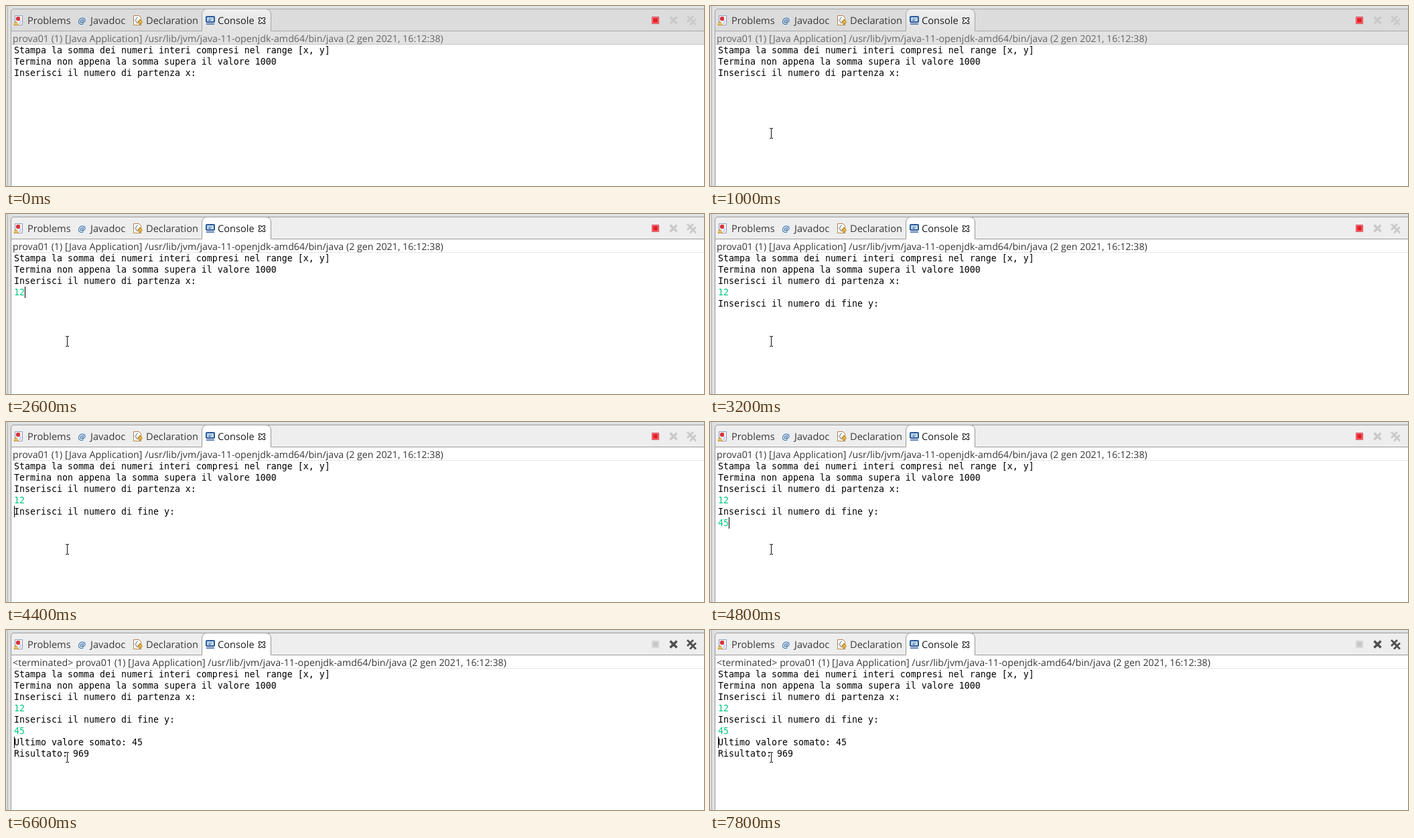
These frames come from a looping animation (1042x270 px, 8000 ms). An HTML page:

```html
<!DOCTYPE html>
<html lang="it">
<head>
<meta charset="utf-8">
<title>Console</title>
<style>
  html, body { margin: 0; width: 100%; height: 100%; overflow: hidden; background: #e1e1e1; }
  svg { display: block; position: absolute; left: 0; top: 0; }
  text { white-space: pre; text-rendering: geometricPrecision; }
  .ui { font: 14.6px "Open Sans", "Noto Sans", sans-serif; fill: #383838; }
  #header { font-size: 14.25px; fill: #666; }
  #console {
    position: absolute; left: 12px; top: 58px; margin: 0; color: #000;
    font: 13.29px/17px "DejaVu Sans Mono", monospace;
  }
  #console div { height: 17px; }
  #console .input { color: #00c87d; }
  .line { fill: none; stroke: #a6a6a6; }
  #bar { fill: #dcdcdc; }
  #tab { fill: url(#tabIdle); }
  #strip { fill: #e2e2e2; }
  #rule { fill: #c6c6c6; }
  .focus #bar { fill: #eee; }
  .focus #tab { fill: #fff; }
  .focus #strip { fill: #fff; }
  .focus #rule { fill: #e6e6e6; }
  .focus #header { fill: #363636; }
  #title { fill: #1c1c1c; }
  .focus .line { stroke: #989898; }
  #stop { fill: #e8202a; stroke: #f28c8c; }
  #stopEdge { fill: #dc4048; }
  .cross { fill: none; stroke: #cacaca; stroke-width: 3.6; }
  .done #stop { fill: #c8c8c8; stroke: #dcdcdc; }
  .done #stopEdge { fill: #d2d2d2; }
  .done .cross { stroke: #505050; }
</style>
</head>
<body>
<svg id="stage" width="1042" height="270" viewBox="0 0 1042 270">
  <defs>
    <linearGradient id="tabIdle" x2="0" y2="1"><stop stop-color="#efefef"/><stop offset="1" stop-color="#e2e2e2"/></linearGradient>
  </defs>

  <rect width="1042" height="270" fill="#e1e1e1"/>
  <path d="M2.5 0V270" stroke="#adadad"/>
  <path id="bar" d="M7.5 38V9Q7.5 4.5 12 4.5H1042V38Z"/>
  <rect id="strip" x="8" y="38" width="1034" height="232"/>
  <rect x="9" y="58" width="1033" height="212" fill="#fff"/>
  <rect id="rule" x="9" y="57" width="1033" height="1"/>
  <path id="tab" d="M292.5 39V13Q292.5 4.5 300 4.5H387Q395.5 4.5 395.5 13V39Z"/>
  <path class="line" d="M7.5 270V9Q7.5 4.5 12 4.5H1042M8 37.5H292.5V13Q292.5 4.5 300 4.5H387Q395.5 4.5 395.5 13V37.5H1042"/>

  <g class="ui">
    <text x="32" y="27">Problems</text>
    <text x="126" y="27">Javadoc</text>
    <text x="209" y="27">Declaration</text>
    <text x="316" y="27" id="title">Console</text>
    <text x="10" y="54" id="header"></text>
  </g>

  <!-- problems -->
  <path d="M13.5 14.5H24.5V28.5H13.5Z" fill="#f7f8fc" stroke="#8f9bb5"/>
  <path d="M19 25.5H23M20 22.5H23" stroke="#8fa4cc"/>
  <rect x="15" y="16" width="6" height="6" rx="2" fill="#d9303a"/>
  <path d="M15 23L18 28.5H12Z" fill="#fbd35c" stroke="#c88a1e"/>
  <!-- javadoc -->
  <text x="107.5" y="26" font-family="DejaVu Sans, sans-serif" font-size="12" font-weight="bold" font-style="italic" fill="#3572ad">@</text>
  <!-- declaration -->
  <path d="M190.5 14.5H198.5L201.5 17.5V28.5H190.5Z" fill="#fffdf3" stroke="#a98646"/>
  <path d="M197 17.5Q193.5 17 194.5 20Q194 21.5 192.5 21.5Q194 21.5 194.5 23Q193.5 26 197 25.5" fill="none" stroke="#5b7bab"/>
  <path d="M197 22.5H199.5V20L203.5 24L199.5 28V25.5H197Z" fill="#f6c04b" stroke="#a86f14"/>
  <!-- console -->
  <rect x="298.5" y="15.5" width="13" height="9" rx="1" fill="#386cae" stroke="#214f8c"/>
  <rect x="300.5" y="17.5" width="9" height="5" fill="#e8f2fc" stroke="#a8c6e6"/>
  <path d="M302 19.5H308M302 21.5H306" stroke="#3a66a2"/>
  <path d="M299 27H311" stroke="#5f7fae" stroke-width="2"/>
  <!-- close -->
  <path d="M377.5 17.5H380L382 19.5L384 17.5H386.5V20L384.5 22L386.5 24V26.5H384L382 24.5L380 26.5H377.5V24L379.5 22L377.5 20Z" fill="#fff" stroke="#262626" stroke-width="1.2"/>
  <!-- toolbar -->
  <rect id="stopEdge" x="964" y="16" width="11" height="11" rx="1"/>
  <rect id="stop" x="965.5" y="17.5" width="8" height="8"/>
  <path class="cross" d="M991.5 16.5L1001.5 26.5M1001.5 16.5L991.5 26.5"/>
  <path class="cross" style="stroke-width:2.8" d="M1017 15L1026 24M1026 15L1017 24M1021 19.5L1030 28.5M1030 19.5L1021 28.5"/>
</svg>

<div id="console"></div>

<svg width="1042" height="270" viewBox="0 0 1042 270">
  <rect id="caret" width="1" height="17"/>
  <g id="mouse" fill="none">
    <path d="M-2 -7.5H0L.5 -7L1 -7.5H3M.5 -7V7M-2 7.5H0L.5 7L1 7.5H3" stroke="#fff" stroke-width="3" opacity=".8"/>
    <path d="M-2 -7.5H0L.5 -7L1 -7.5H3M.5 -7V7M-2 7.5H0L.5 7L1 7.5H3" stroke="#111"/>
  </g>
</svg>
<script>
const DURATION = 8000, LINE = 17, CHAR = 8, LEFT = 12, TOP = 58;
const LAUNCH = 'prova01 (1) [Java Application] /usr/lib/jvm/java-11-openjdk-amd64/bin/java (2 gen 2021, 16:12:38)';
const INTRO = [
  'Stampa la somma dei numeri interi compresi nel range [x, y]',
  'Termina non appena la somma supera il valore 1000',
  'Inserisci il numero di partenza x:'
];
const INPUT_ROWS = [3, 5];

// Each step changes part of the state; caret is [row, column], mouse is [x, y].
const steps = [
  [0, { x: '', prompt: '', y: '', result: [], caret: null, mouse: null, focus: false, done: false }],
  [500, { mouse: [98, 70] }],
  [600, { mouse: [95, 163] }],
  [700, { mouse: [91, 255] }],
  [1000, { mouse: [91, 191] }],
  [1600, { focus: true, caret: [3, 0] }],
  [1900, { caret: null }],
  [2500, { x: '1', caret: [3, 1] }],
  [2600, { x: '12', caret: [3, 2] }],
  [3000, { caret: [4, 0] }],
  [3100, { prompt: 'Inserisci il numero di fine y:', caret: [5, 0] }],
  [3200, { caret: null }],
  [4400, { caret: [4, 0] }],
  [4500, { y: '4', caret: [5, 1] }],
  [4800, { y: '45', caret: [5, 2] }],
  [5300, { done: true, caret: [6, 0] }],
  [5400, { result: ['Ultimo valore somato: 45', 'Risultato: 969'], caret: null }],
  [6600, { caret: [6, 0] }],
  [7200, { caret: null }],
  [7800, { caret: [6, 0] }]
];

const $ = id => document.getElementById(id);
const stage = $('stage'), header = $('header'), caret = $('caret'), mouse = $('mouse');

const rows = Array.from({ length: 8 }, (_, row) => {
  const line = document.createElement('div');
  line.style.whiteSpace = 'pre';
  if (INPUT_ROWS.includes(row)) line.className = 'input';
  return $('console').appendChild(line);
});

function place(element, point) {
  element.style.display = point ? '' : 'none';
  if (point) element.setAttribute('transform', `translate(${point})`);
}

function render(state) {
  const lines = [...INTRO, state.x, state.prompt, state.y, ...state.result];
  rows.forEach((line, row) => { line.textContent = lines[row] || ''; });
  header.textContent = (state.done ? '<terminated> ' : '') + LAUNCH;
  stage.classList.toggle('focus', state.focus);
  stage.classList.toggle('done', state.done);
  place(caret, state.caret && [LEFT + state.caret[1] * CHAR, TOP + state.caret[0] * LINE]);
  place(mouse, state.mouse);
}

const start = performance.now();
let shown = 0;

function tick() {
  const time = (performance.now() - start) % DURATION;
  const past = steps.filter(([at]) => at <= time);
  if (past.length !== shown) {
    shown = past.length;
    render(Object.assign({}, ...past.map(([, change]) => change)));
  }
  requestAnimationFrame(tick);
}
tick();
</script>
</body>
</html>
```
